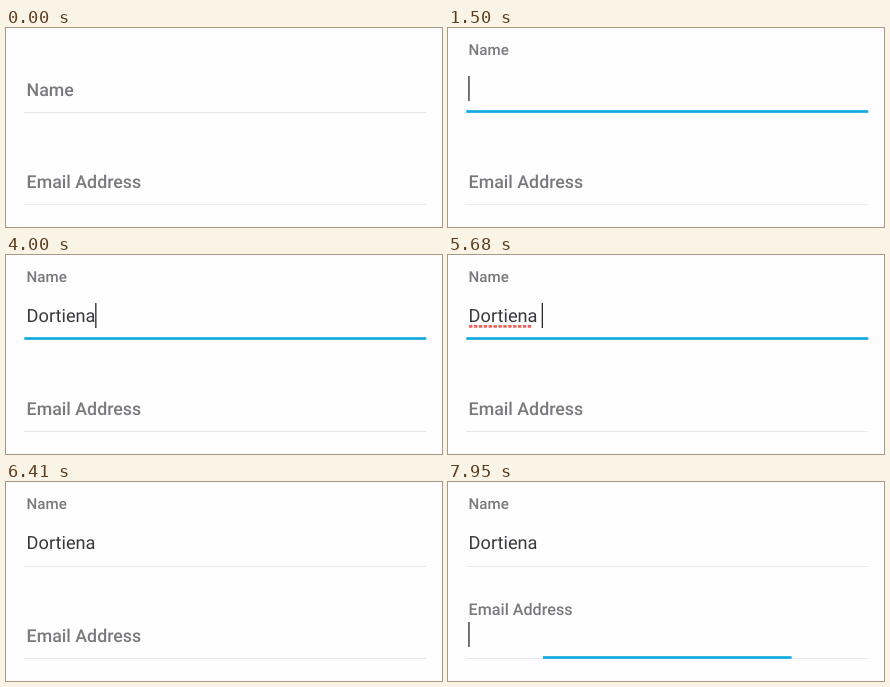
Animation of 436 by 199 pixels, one loop 8000 ms. Source, as an HTML page:

```html
<!DOCTYPE html>
<html lang="en">
<head>
<meta charset="utf-8">
<title>Floating labels</title>
<style>
  html, body { margin: 0; width: 100%; height: 100%; overflow: hidden; background: #fefdff; }
  svg { display: block; width: 436px; height: 199px; }
  text { font-family: Roboto, sans-serif; text-rendering: geometricPrecision; white-space: pre; }
  .label { font-size: 17.8px; font-weight: 500; fill: #7a7a7d; }
  .value { font-size: 18.2px; fill: #39393c; }
  .rule { fill: #e9e8f0; }
  .accent { fill: #0ca8de; }
  .caret { fill: #2a2a2e; }
  .misspelt { stroke: #ea4a3f; stroke-width: 2.8; stroke-dasharray: 3.4 1.5; }
</style>
</head>
<body>
<svg viewBox="0 0 436 199">
  <g class="field">
    <text class="label">Name</text>
    <rect class="rule" x="18" y="84" width="402" height="1"/>
    <rect class="accent" y="82.2" height="2.6"/>
    <text class="value" x="20.6" y="66.9"></text>
    <path class="misspelt" d="M21 71.4H84.6"/>
    <rect class="caret" y="48" width="1.3" height="25"/>
  </g>
  <g class="field" transform="translate(0 92)">
    <text class="label">Email Address</text>
    <rect class="rule" x="18" y="84" width="402" height="1"/>
    <rect class="accent" y="82.2" height="2.6"/>
    <rect class="caret" y="48" width="1.3" height="25"/>
  </g>
</svg>
<script>
const LOOP = 8000;
const NAME = "Dortiena ";
const KEY_TIMES = [2590, 2860, 3050, 3180, 3360, 3590, 3770, 4000, 4230];
const FOCUS = [1320, 7910], BLUR = 6050;
const FRAME = 45;
const CARET_X = 20.3;

const clamp = v => Math.min(1, Math.max(0, v));
// Progress that is already one video frame in when it begins.
const progress = (t, start, duration) => t < start ? 0 : clamp((t - start + FRAME) / duration);
const easeOut = (p, power) => 1 - (1 - p) ** power;
const within = (t, from, to) => t >= from && t < to;

const fields = [...document.querySelectorAll(".field")].map(field => {
  const part = name => field.querySelector("." + name);
  return { label: part("label"), accent: part("accent"), caret: part("caret") };
});
const value = document.querySelector(".value");
const misspelt = document.querySelector(".misspelt");

function drawField({ label, accent, caret }, focus, accentOpacity, caretX, caretOn) {
  const open = easeOut(focus, 2), rise = 41 * easeOut(focus, 2.2);
  label.setAttribute("transform", `translate(20.6 ${68.1 - rise}) scale(${1 - 0.15 * open})`);
  accent.setAttribute("x", 219.3 - 201 * open);
  accent.setAttribute("width", 402 * open);
  accent.setAttribute("opacity", accentOpacity);
  caret.setAttribute("x", caretX);
  caret.setAttribute("opacity", caretOn ? 1 : 0);
}

function draw(t) {
  const typed = NAME.slice(0, KEY_TIMES.filter(k => t >= k).length);
  if (value.textContent !== typed) value.textContent = typed;
  const caretX = CARET_X + (typed ? value.getComputedTextLength() : 0);
  const caretOn = within(t, FOCUS[0], 2000) || within(t, 2500, 4730) || within(t, 5230, 5730);

  const [nameFocus, emailFocus] = FOCUS.map(start => progress(t, start, 225));
  drawField(fields[0], nameFocus, 1 - progress(t, BLUR, 405), caretX, caretOn);
  drawField(fields[1], emailFocus, 1, CARET_X, t >= FOCUS[1]);

  const fade = clamp((t - 5230) / 1180);
  misspelt.setAttribute("opacity", progress(t, 4230, 175) * (1 - fade ** 2));
}

function tick() {
  draw(performance.now() % LOOP);
  requestAnimationFrame(tick);
}
tick();
</script>
</body>
</html>
```
